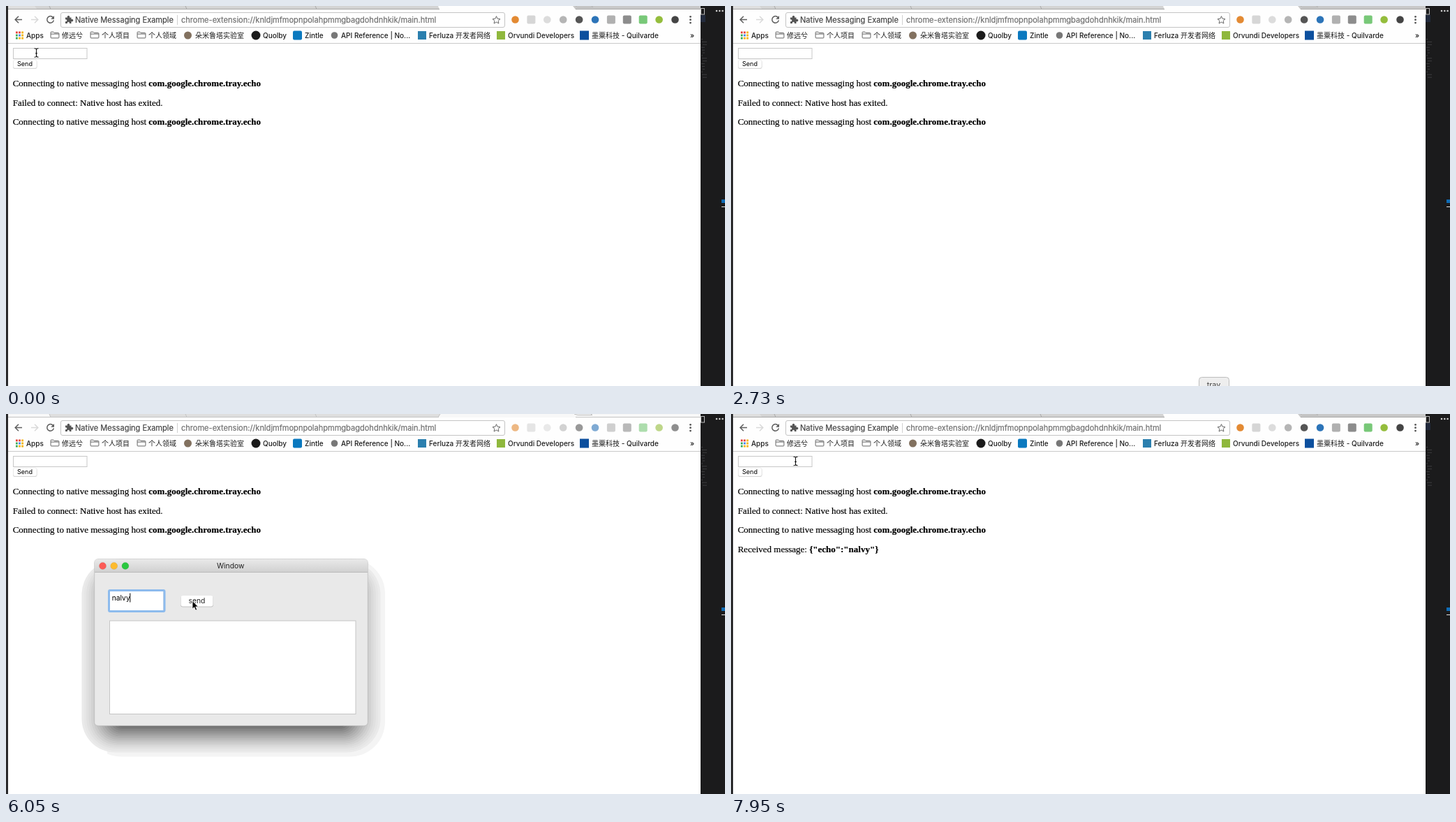
Recreate the animation shown at these times as an HTML page. Size 1030 by 544 pixels, loop 8000 ms.

```html
<!DOCTYPE html>
<html lang="en">
<head>
<meta charset="utf-8">
<title>Native messaging demo</title>
<style>
  html, body { margin: 0; width: 100%; height: 100%; overflow: hidden; background: #fff; }
  svg { display: block; width: 1030px; height: 544px; }
  text { white-space: pre; font-family: Inter, "Noto Sans CJK SC", "Noto Sans CJK", sans-serif; }
  .page text { font: 13px "Liberation Serif", serif; stroke: #000; stroke-width: .2; }
  .bold { font-weight: bold; }
  .marks text { font-size: 10px; font-weight: 500; fill: #1c1c1c; }
  .address text { font-size: 11.05px; stroke-width: .2; }
  .line { fill: none; stroke: #5f5f5f; stroke-width: 1.5; }
</style>
</head>
<body>
<svg viewBox="0 0 1030 544">
  <defs>
    <linearGradient id="titleFill" x2="0" y2="1">
      <stop stop-color="#e9e9e9"/><stop offset="1" stop-color="#d1d1d1"/>
    </linearGradient>
    <path id="folder" d="M.6 8.5V1.2Q.6.6 1.2.6H4.4L5.6 2H11.4Q12.4 2 12.4 3V8.5Q12.4 9.4 11.5 9.4H1.5Q.6 9.4.6 8.5ZM.6 3.6H12.4" fill="none" stroke="#666"/>
    <clipPath id="rightPart"><rect x="145" y="200" width="420" height="300"/></clipPath>
  </defs>

  <rect width="1030" height="544" fill="#fff"/>

  <!-- tab strips -->
  <g id="stripActive">
    <rect width="995" height="5" fill="#c8c8c8"/>
    <path d="M3 0H620L623 5H3Z" fill="#d3d3d3"/>
    <path d="M3 0H41L45 5H3Z" fill="#dedede"/>
    <path d="M619 0H812L816 5H621Z" fill="#fefefe"/>
    <path d="M816 0H838L841 1.5H818Z" fill="#dcdcdc" stroke="#aaa" stroke-width=".6"/>
    <path d="M3 4.5H621M816 4.5H995M62 0L64 4.5M257 0L259 4.5M443 0L445 4.5" stroke="#a8a8a8" fill="none"/>
  </g>
  <g id="stripIdle">
    <rect width="995" height="5" fill="#f8f8f8"/>
    <path d="M62 0H622L619 5H64Z" fill="#dedede"/>
    <path d="M3 4.5H620M816 4.5H995M62 0L64 4.5M257 0L259 4.5M443 0L445 4.5M622 0L619 4.5" stroke="#c4c4c4" fill="none"/>
    <path d="M814 0L819 1.5H840L838 0" stroke="#bbb" fill="none"/>
  </g>

  <!-- toolbar -->
  <rect y="5" width="995" height="48" fill="#fefefe"/>
  <path d="M0 53.5H995" stroke="#cacaca"/>
  <path class="line" d="M23 19.5H13.5M18 14.8L13.2 19.5L18 24.2"/>
  <path class="line" d="M36 19.5H45.5M41 14.8L45.8 19.5L41 24.2" style="stroke:#d9d9d9"/>
  <path class="line" d="M67.4 16.5A4.8 4.8 0 1 0 68.3 20.3"/>
  <path d="M69 14V18.8H64.2Z" fill="#5f5f5f"/>
  <rect x="78.5" y="9.5" width="636" height="21" rx="2.5" fill="#fff" stroke="#c4c4c4"/>
  <path d="M85 16.5H88A1.8 1.8 0 1 1 91 16.5H93.5V19A1.8 1.8 0 1 1 93.5 22V25H90.8A1.6 1.6 0 1 0 88 25H85V22.2A1.6 1.6 0 1 0 85 19.3Z" fill="#555"/>
  <g class="address">
    <text x="99" y="24" fill="#444" stroke="#444">Native Messaging Example</text>
    <text x="251" y="24" fill="#707070" stroke="#707070">chrome-extension://knldjmfmopnpolahpmmgbagdohdnhkik/main.html</text>
  </g>
  <path d="M245.5 13V27" stroke="#d0d0d0"/>
  <path d="M702.5 14.6L704.1 18.2L708 18.6L705.1 21.2L705.9 25L702.5 23L699.1 25L699.9 21.2L697 18.6L700.9 18.2Z" fill="none" stroke="#666"/>
  <g id="extensions"></g>
  <g fill="#555"><circle cx="980.5" cy="15.3" r="1.4"/><circle cx="980.5" cy="19.7" r="1.4"/><circle cx="980.5" cy="24.1" r="1.4"/></g>

  <!-- bookmarks -->
  <g class="marks">
    <g id="appGrid"></g>
    <use href="#folder" x="63.5" y="36.5"/><use href="#folder" x="120.5" y="36.5"/><use href="#folder" x="187.5" y="36.5"/>
    <circle cx="260.5" cy="42" r="5.5" fill="#82715f"/>
    <circle cx="358" cy="42" r="6.5" fill="#1b1b1b"/>
    <rect x="411" y="35.5" width="13" height="13" rx="2" fill="#0b79bf"/>
    <circle cx="470.5" cy="42" r="4.8" fill="#777"/>
    <rect x="590" y="36" width="12" height="12" fill="#2b7fae"/>
    <rect x="703" y="36" width="12" height="12" fill="#8fb83d"/>
    <rect x="822" y="35.5" width="13" height="13" fill="#0c4f9e"/>
    <g id="markLabels"></g>
  </g>

  <!-- page -->
  <rect x="10.5" y="60.5" width="105.5" height="15" fill="#fff" stroke="#c8c8c8"/>
  <rect x="10" y="77.5" width="34.5" height="12.5" rx="3" fill="#cdcdcd"/>
  <rect x="10.5" y="77" width="33.5" height="12" rx="2.5" fill="#fff" stroke="#e8e8e8" stroke-width=".7"/>
  <text x="27" y="86.4" font-size="9.1" text-anchor="middle">Send</text>
  <g class="page">
    <text x="9.7" y="115">Connecting to native messaging host <tspan class="bold">com.google.chrome.tray.echo</tspan></text>
    <text x="9.7" y="142.7">Failed to connect: Native host has exited.</text>
    <text x="9.7" y="170.3">Connecting to native messaging host <tspan class="bold">com.google.chrome.tray.echo</tspan></text>
    <text id="reply" x="9.7" y="198">Received message: <tspan class="bold">{"echo":"nalvy"}</tspan></text>
  </g>

  <!-- dark edges -->
  <rect width="3" height="544" fill="#2a2a2c"/>
  <rect x="995" width="35" height="544" fill="#1b1b1c"/>
  <g id="minimap"></g>
  <rect x="995.5" y="3.5" width="5" height="8.5" fill="none" stroke="#bbb"/>
  <rect id="edgeMark" x="995" y="13" width="7" height="10" fill="#222a3c"/>
  <g fill="#d0d0d0"><circle cx="1018" cy="7" r="1.3"/><circle cx="1022.3" cy="7" r="1.3"/><circle cx="1026.6" cy="7" r="1.3"/></g>
  <rect x="1025" y="277" width="5" height="5" fill="#0f6cb5"/>
  <rect x="1025" y="287" width="5" height="1" fill="#e4e4e4"/>

  <!-- dock label -->
  <g id="tray">
    <rect id="trayBox" x="670.5" y="531.5" width="43" height="20" rx="4" stroke="#bdbdbd"/>
    <text x="691.5" y="545.5" font-size="10.8" fill="#444" text-anchor="middle">tray</text>
  </g>

  <!-- native window -->
  <g id="panel">
    <g id="coarseShadow"></g>
    <g id="fineShadow">
      <rect x="115" y="207" width="428" height="283.5" rx="50" fill="#f4f4f4" clip-path="url(#rightPart)"/>
    </g>
    <rect x="126.7" y="207.7" width="391.6" height="238.6" rx="5" fill="#e9e9e9" stroke="#b4b4b4" stroke-width=".6"/>
    <path d="M127 226V213Q127 208 132 208H513Q518 208 518 213V226Z" fill="url(#titleFill)"/>
    <path d="M127 226.5H518" stroke="#b9b9b9"/>
    <g stroke="#000" stroke-opacity=".12" stroke-width=".6">
      <circle cx="138.5" cy="217.5" r="5" fill="#fc5b57"/>
      <circle cx="154.7" cy="217.5" r="5" fill="#fdbb2f"/>
      <circle cx="170.9" cy="217.5" r="5" fill="#2bc840"/>
    </g>
    <text x="321.7" y="221.4" font-size="10.3" fill="#222" text-anchor="middle">Window</text>
    <rect x="148.5" y="253.5" width="77.5" height="28" fill="#fff" stroke="#bfbfbf"/>
    <rect id="focus" x="147.5" y="252.5" width="79.5" height="30" rx="1.5" fill="none" stroke="#8dbbed" stroke-width="3"/>
    <text id="typed" x="151.7" y="267" font-size="10.3"></text>
    <rect id="caret" y="256.5" width="1" height="13"/>
    <rect x="250" y="260.5" width="47" height="16" rx="3.5" fill="#c2c2c2"/>
    <rect id="sendBox" x="250.5" y="260" width="46" height="15.6" rx="3"/>
    <text id="sendText" x="273.5" y="271.3" font-size="10.3" text-anchor="middle">send</text>
    <rect x="148.5" y="296" width="352.5" height="133.5" fill="#fff" stroke="#c5c5c5"/>
  </g>

  <path id="arrow" d="M0 0V11.6L2.7 9.2L4.6 13.6L6.7 12.7L4.8 8.4H8.4Z" fill="#000" stroke="#fff" stroke-width=".8"/>
  <path id="ibeam" d="M-3-6.3Q0-6.3 0-4.6Q0-6.3 3-6.3M0-5V5M-3 6.3Q0 6.3 0 4.6Q0 6.3 3 6.3M-1.5.8H1.5" fill="none" stroke="#111" stroke-width="1.1"/>
</svg>

<script>
const LOOP = 8000;
const $ = id => document.getElementById(id);

function add(parent, tag, attrs, content = "") {
  const el = document.createElementNS("http://www.w3.org/2000/svg", tag);
  for (const key in attrs) el.setAttribute(key, attrs[key]);
  el.textContent = content;
  return $(parent).appendChild(el);
}

[[29, "Apps"], [80, "修远兮"], [137, "个人项目"], [204, "个人领域"], [271, "朵米鲁塔实验室"],
 [368, "Quolby"], [428, "Zintle"], [480, "API Reference | No..."], [606, "Ferluza 开发者网络"],
 [719, "Orvundi Developers"], [839, "墨粟科技 - Quilvarde"], [980, "»"]]
  .forEach(([x, label]) => add("markLabels", "text", { x, y: 45.7 }, label));

["#e8453c", "#e8453c", "#f5b400", "#3cab57", "#4285f4", "#f5b400", "#3cab57", "#f5b400", "#f5b400"]
  .forEach((fill, i) => add("appGrid", "rect",
    { x: 14 + i % 3 * 4.1, y: 36.5 + Math.floor(i / 3) * 4.1, width: 2.8, height: 2.8, fill }));

["#e38a33", "#d6d6d6", "#dcdcdc", "#b5b5b5", "#555", "#2c74b8", "#b0b0b0", "#8c8c8c", "#78c878", "#94bd3c", "#444"]
  .forEach((fill, i) => {
    const cx = 729.5 + i * 22.9;
    if ([1, 6, 7, 8].includes(i)) add("extensions", "rect", { x: cx - 6, y: 13.5, width: 12, height: 12, rx: 2, fill });
    else add("extensions", "circle", { cx, cy: 19.5, r: 5.3, fill });
  });

for (let i = 0; i < 15; i++) {
  add("minimap", "rect", { x: 996 + i % 3, y: 47 + i * 3.9, width: 2 + i * 5 % 6, height: 1, fill: "#3c3c3f" });
}

// Nested rounded shapes give the stepped drop shadow.
function shadow(id, count, light, dark) {
  for (let i = 0; i < count; i++) {
    const k = i / (count - 1), shade = Math.round(light + (dark - light) * k ** 1.3);
    add(id, "rect", {
      x: 108.5 + 47 * k, y: 210 + 30 * k, width: 428 - 94 * k, height: 274.5 - 66 * k,
      rx: 48 - 36 * k, fill: `rgb(${shade},${shade},${shade})`
    });
  }
}
shadow("coarseShadow", 8, 233, 125);
shadow("fineShadow", 15, 234, 112);

// time, x, y, pointer: a = arrow, i = I-beam, none = hidden
const pointer = [
  [0, 43.5, 67, "i"], [300, 59, 37, "a"], [470, 282, 82, "a"], [640, 518, 133, "a"], [810, 572, 259.5, "a"],
  [1100, 640, 400, "a"], [1247, 700, 518, "a"], [1394, 560, 390, "a"], [1541, 330, 210, "a"],
  [1688, 91, 102, "a"], [1835, 150, 140, "a"], [1982, 220, 190, "a"], [2130, 284, 243, "a"],
  [2280, 380, 330, "a"], [2430, 520, 430, "a"], [2580, 640, 515, "a"], [2730, 0, 0, ""],
  [3030, 627, 431.5, "a"], [3170, 520, 385, "a"], [3340, 340, 310, "a"], [3510, 200, 268, "a"],
  [3680, 167, 263, "i"], [4130, 0, 0, ""],
  [5460, 175, 266, "i"], [5607, 205, 272, "i"], [5754, 238, 279, "a"], [5901, 258, 273, "a"], [6050, 267, 267.5, "a"],
  [6490, 262, 262, "a"], [6630, 240, 240, "a"], [6777, 205, 200, "a"], [6924, 165, 150, "a"],
  [7071, 130, 112, "a"], [7218, 105, 85, "a"], [7365, 94, 75, "a"], [7510, 90, 70.5, "a"], [7800, 92.5, 67.5, "i"]
];
const keys = [4130, 4277, 4423, 4570, 4870];
const word = "nalvy";

const at = (steps, t) => steps.filter(step => step[0] <= t).pop();
const show = (id, on) => { $(id).style.display = on ? "" : "none"; };

function draw(t) {
  const within = (from, to) => t >= from && t < to;
  const idle = within(3030, 7800), pressed = within(6190, 6340);

  show("stripIdle", idle);
  show("stripActive", !idle);
  show("edgeMark", !idle);
  $("extensions").setAttribute("opacity", idle ? .6 : 1);
  show("reply", t >= 6340);

  show("tray", within(2730, 3170));
  $("trayBox").setAttribute("fill", t < 3030 ? "#eee" : "#fff");

  show("panel", within(3030, 7660));
  show("coarseShadow", t < 3170);
  show("fineShadow", t >= 3170);
  show("focus", t >= 3680);
  $("typed").textContent = word.slice(0, keys.filter(k => k <= t).length);
  const textWidth = within(3030, 7660) ? $("typed").getComputedTextLength() : 0;
  $("caret").setAttribute("x", 151.3 + textWidth);
  $("sendBox").setAttribute("fill", pressed ? "#3f8df6" : "#fff");
  $("sendText").setAttribute("fill", pressed ? "#fff" : "#222");

  const [, x, y, kind] = at(pointer, t);
  show("arrow", kind === "a");
  show("ibeam", kind === "i");
  for (const id of ["arrow", "ibeam"]) $(id).setAttribute("transform", `translate(${x} ${y})`);
}

const start = performance.now();
function tick() {
  draw((performance.now() - start) % LOOP);
  requestAnimationFrame(tick);
}
tick();
</script>
</body>
</html>
```
